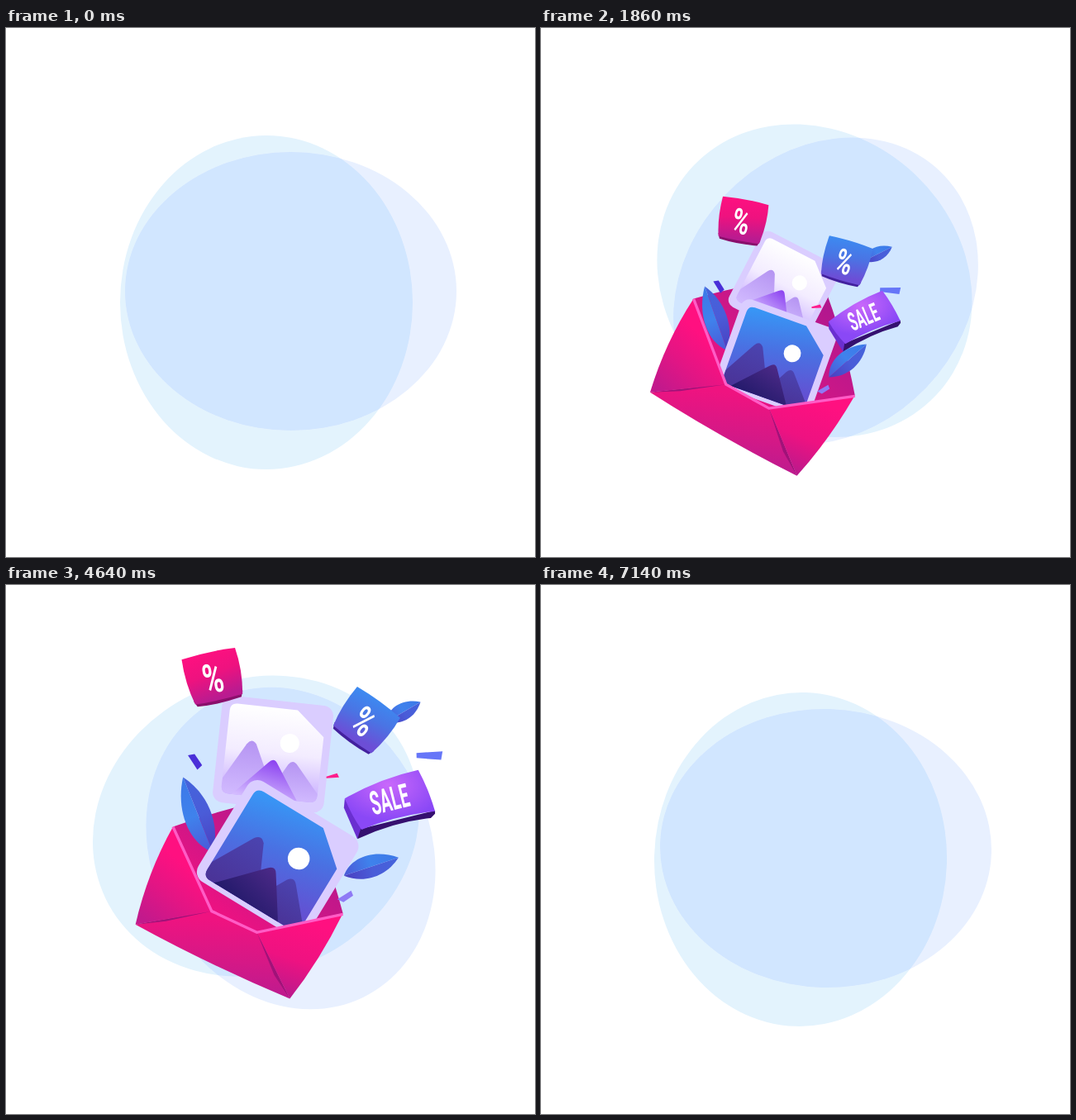
Animation, 640 px wide and 640 px high, one loop 7210 ms. Source, as an HTML page:

```html
<!DOCTYPE html>
<html lang="en">
<head>
<meta charset="utf-8">
<title>Sale envelope</title>
<style>
  html, body { margin: 0; width: 100%; height: 100%; overflow: hidden; background: #fff; }
  svg { display: block; width: 100%; height: 100%; }
  text { font-family: Roboto, sans-serif; font-weight: 700; fill: #fff; text-anchor: middle; }
</style>
</head>
<body>
<svg id="stage" viewBox="0 0 640 640"></svg>
<script>
const LOOP = 7210;
const stage = document.getElementById('stage');

// ---------- artwork ----------
const gradient = (id, x1, y1, x2, y2, ...colors) =>
  `<linearGradient id="${id}" x1="${x1}" y1="${y1}" x2="${x2}" y2="${y2}">` +
  colors.map((c, i) => `<stop offset="${i / (colors.length - 1)}" stop-color="${c}"/>`).join('') +
  '</linearGradient>';

const shape = (d, fill) => `<path d="${d}" fill="${fill}"/>`;
const dash = (points, fill) => `<polygon points="${points}" fill="${fill}"/>`;

const PANE = 'M-76,-46H6L45,-13V67Q45,77 35,77H-76Q-86,77 -86,67V-36Q-86,-46 -76,-46Z';

const photo = (name, height) => `
  <rect x="-97" y="-56" width="152" height="${height}" rx="14" fill="#dacdff"/>
  ${shape(PANE, `url(#${name}Sky)`)}
  <g clip-path="url(#pane)">
    ${shape('M-90,64L-58,7Q-52,-2 -45,6L-10,80H-90Z', `url(#${name}Hill)`)}
    ${shape('M-27,80L1,29Q7,20 14,29L46,66V80Z', `url(#${name}Hill)`)}
    ${shape('M-74,80L-26,29Q-19,21 -14,29L20,80Z', `url(#${name}Peak)`)}
  </g>
  <circle r="13" fill="#fff"/>`;

const tile = (name, side) =>
  shape('M-27,21L30,21L27,28Q0,31 -24,28Z', side) +
  shape('M-30,-28Q2,-31 32,-28Q35,-2 29,25Q0,27 -26,25Q-32,0 -30,-28Z', `url(#${name})`) +
  '<text transform="rotate(3) scale(.7 1)" y="16.5" font-size="46">%</text>';

const leaf = (width) => `<g transform="scale(1 ${width})">` +
  shape('M0,0C15,-21 45,-21 69,0Z', 'url(#leafTop)') +
  shape('M0,0C20,19 48,19 69,0Z', 'url(#leafLow)') + '</g>';

const chip = `<g transform="translate(-457 -271)">
  ${shape('M404,270L403,281L419,318L425,306Z', '#6a2fd0')}
  ${shape('M423,306L511,284L511,288L506,293Q462,298 419,318Z', '#35106f')}
  ${shape('M404,270Q446,246 491,236Q503,258 511,285Q465,290 424,307Q412,290 404,270Z', 'url(#chipFace)')}
  <text transform="translate(457 271) rotate(-14) scale(.5 1)" y="13.5" font-size="39">SALE</text></g>`;

const centred = (content) => `<g transform="translate(-279.5 -409.5)">${content}</g>`;
const envelopeBack = centred(
  shape('M199,297Q265,273 342,259Q353,258 357,267Q387,330 406,403L301,426L246,400Z', 'url(#lining)'));
const envelopeFront = centred(`
  ${shape('M153,416L246,399L301,425L341,507Q240,464 153,416Z', 'url(#pocket)')}
  ${shape('M199,297L246,400L153,416Q168,352 199,297Z', 'url(#flapLeft)')}
  ${shape('M406,403L301,426L341,507Q378,460 406,403Z', 'url(#flapRight)')}
  ${shape('M153,416L246,400L190,412Z', '#a01279')}
  ${shape('M301,426L341,507L322,478Z', '#a01279')}
  <path d="M199,297L246,400L301,426L406,404" fill="none" stroke="#ff5cc6" stroke-width="3.4"/>`);

// ---------- scene, back to front ----------
// An item flies between two poses [x, y, turn], measured from the envelope's centre,
// and grows from a fraction of its final size.
const item = (art, from, to, size = 1.05, seed = .37) => ({ art, from, to, size, seed });
const fixed = (art) => ({ art });

const layers = [
  fixed(envelopeBack),
  item(leaf(.78), [-30, 5, -104], [-32, -84, -112], 1.45, .54),
  item(dash('-8,-8 0,-9 8,5 2,10', '#4a2fd8'), [-16, -8, 0], [-55, -198, -4]),
  item(photo('pale', 146), [51, 25, 72], [62, -222, 4], .915),
  item(dash('-7,0 6,-3 8,2 -7,2', '#ff1e8c'), [6, 32, 0], [117, -181, -4]),
  item(photo('blue', 139), [0, 0, -5], [75, -76, 32.5]),
  item(dash('-15,-4 16,-5 14,5 -15,2', '#6676f8'), [40, 22, 8], [238, -206, -2]),
  item(dash('-10,3 7,-6 9,0 -3,7', '#8f7af5'), [0, 40, 0], [134, -30, -4]),
  item(chip, [40, 12, -27], [188, -151, 1]),
  item(leaf(.9), [25, 47, -90], [131, -56, -16], 1.03, .62),
  fixed(envelopeFront),
  item(leaf(1), [49, -4, -18], [184, -248, -31], .71, .41),
  item(tile('blueTile', '#43219e'), [33, 0, -24], [156, -249, 38], 1.06, .57),
  item(tile('pinkTile', '#8a0f6c'), [24, -44, 60], [-34, -302, -15], 1.09, .57),
];

stage.innerHTML = `<defs>
  ${gradient('blueSky', 0, 0, .25, 1, '#3699f7', '#4a70e2', '#6350d2')}
  ${gradient('blueHill', 0, 0, 0, 1, '#4b44b0', '#4a3296')}
  ${gradient('bluePeak', .6, 0, .2, 1, '#4d2a88', '#231a6b')}
  ${gradient('paleSky', 0, 0, 0, 1, '#ffffff', '#f3ecff', '#c6acff')}
  ${gradient('paleHill', 0, 0, 0, 1, '#b594f2', '#d2bbff')}
  ${gradient('palePeak', .6, 0, .3, 1, '#8b41f0', '#d4bcff')}
  ${gradient('pinkTile', 0, 0, .15, 1, '#ff1080', '#ee127f', '#b91b90')}
  ${gradient('blueTile', 0, 0, .2, 1, '#3b8cf2', '#4a74e4', '#6c4ed6')}
  ${gradient('leafTop', 1, 0, 0, 0, '#3c78e8', '#3f82ec', '#4c57d6')}
  ${gradient('leafLow', 1, 0, 0, 0, '#4464dc', '#4a5cd8', '#4a3fc0')}
  ${gradient('lining', .25, .9, .85, .3, '#f01181', '#cc1787', '#b3178e')}
  ${gradient('pocket', .5, .1, .4, 1, '#ef1380', '#d61886', '#b81b90')}
  ${gradient('flapLeft', .6, .35, .2, 1, '#ff1080', '#e31584', '#c2198c')}
  ${gradient('flapRight', .6, .1, .3, 1, '#ff1080', '#ee1281', '#b51a8d')}
  <radialGradient id="chipFace" cx=".48" cy=".25" r=".6">
    <stop offset="0" stop-color="#c968fb"/><stop offset="1" stop-color="#8a48f6"/></radialGradient>
  <clipPath id="pane"><path d="${PANE}"/></clipPath>
  <clipPath id="inCyan"><ellipse class="cyan" rx="177" ry="202"/></clipPath>
</defs>
<ellipse class="cyan" rx="177" ry="202" fill="#e3f3fd"/>
<ellipse class="lavender" rx="200.5" ry="168.5" fill="#e8f0ff"/>
<g clip-path="url(#inCyan)"><ellipse class="lavender" rx="200.5" ry="168.5" fill="#d1e6ff"/></g>
<g id="scene">${layers.map((layer) => `<g>${layer.art}</g>`).join('')}</g>`;

const scene = document.getElementById('scene');

// ---------- motion ----------
const ramp = (t, from, to) => Math.min(1, Math.max(0, (t - from) / (to - from)));
const smooth = (u) => u * u * (3 - 2 * u);
const mix = (a, b, u) => a + (b - a) * u;
const fade = (t, outStart, outEnd) => ramp(t, 700, 1000) * (1 - ramp(t, outStart, outEnd));

function place(node, x, y, turn, size = 1) {
  node.setAttribute('transform', `translate(${x} ${y}) rotate(${turn}) scale(${size})`);
}

// Both ellipses make half a turn per loop; the cyan one also drifts around.
function drawBlobs(t) {
  const turn = -180 * t / LOOP, phase = 2 * Math.PI * t / LOOP;
  for (const node of stage.querySelectorAll('.cyan'))
    place(node, 315 + 16 * Math.sin(phase), 307 + 25 * Math.cos(phase), turn);
  for (const node of stage.querySelectorAll('.lavender')) place(node, 344.5, 318.5, turn);
}

function drawScene(t) {
  const rise = smooth(ramp(t, 400, 3500));
  const leave = Math.max(0, (t - 3710) / 2430) ** 3;
  const burst = Math.max(0, 1 - Math.exp((610 - t) / 1170));

  place(scene,
    236 + 43.5 * rise + 46.5 * leave,
    470.5 - 61 * rise - 98 * leave,
    0, .96 + .04 * rise - .139 * leave);

  layers.forEach(({ from, to, size, seed }, i) => {
    const node = scene.children[i];
    if (from) {
      const [x, y, turn] = from.map((v, k) => mix(v, to[k], burst));
      place(node, x, y, turn, size * mix(seed, 1, burst));
    } else {
      place(node, 0, 0, 7 - 7 * rise - 2 * leave);
    }
    node.setAttribute('opacity', from ? fade(t, 6000, 6420) : fade(t, 6160, 6560));
  });
}

const start = performance.now();
function tick() {
  const t = (performance.now() - start) % LOOP;
  drawBlobs(t);
  drawScene(t);
  requestAnimationFrame(tick);
}
tick();
</script>
</body>
</html>
```
